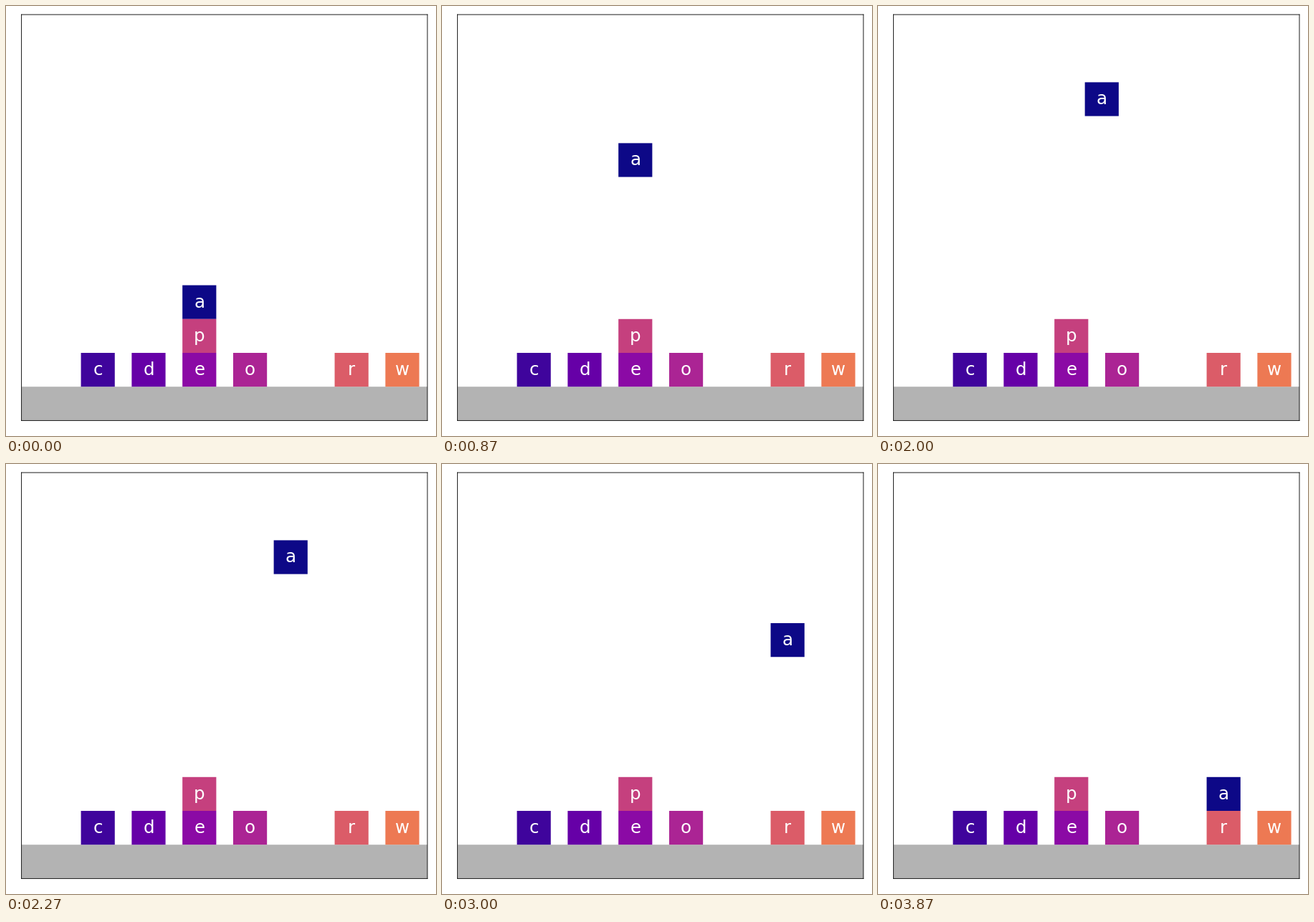
Animation, 600 px wide and 600 px high, one loop 4.87 s. Source, as a matplotlib script:

```python
import matplotlib.pyplot as plt
from matplotlib.animation import FuncAnimation
from matplotlib.patches import Rectangle

LOOP_MS, TICK_MS = 4870, 10
LAST_STEP = 58
LIFT, SLIDE, DROP = 0.3, 0.45, 0.35  # cells per step
START = (4.758, 3)

# letter: lower-left corner in cells, ordered along the colour map
BLOCKS = {
    "a": START,
    "c": (1.758, 1),
    "d": (3.258, 1),
    "e": (4.758, 1),
    "o": (6.258, 1),
    "p": (4.758, 2),
    "r": (9.258, 1),
    "w": (10.758, 1),
}

fig = plt.figure(figsize=(7.5, 7.5), dpi=80, facecolor="white")
ax = fig.add_axes([21.6 / 600, 21.6 / 600, 566.4 / 600, 566.4 / 600])
ax.set(xlim=(0, 12), ylim=(0, 12), xticks=[], yticks=[])
for spine in ax.spines.values():
    spine.set_snap(False)


def add_box(corner, width, color):
    return ax.add_patch(Rectangle(corner, width, 1, facecolor=color,
                                  linewidth=0, snap=False))


def label_position(x, y):
    return x + 0.5, y + 0.49


def add_block(letter, corner, color):
    label = ax.text(*label_position(*corner), letter, color="white",
                    fontsize=22, family="DejaVu Sans",
                    ha="center", va="center")
    return add_box(corner, 1, color), label


add_box((0, 0), 12, "0.7")
shades = [plt.cm.plasma(i * 2 / 21) for i in range(len(BLOCKS))]
artists = {letter: add_block(letter, corner, shade)
           for (letter, corner), shade in zip(BLOCKS.items(), shades)}


def clamp(value, low, high):
    return max(low, min(value, high))


def carried_position(step):
    """Lift, pause, slide and drop; lift and slide skip their first step."""
    lifted = clamp(step + 1, 0, 20) if step >= 1 else 0
    slid = clamp(step - 28, 0, 10) if step >= 30 else 0
    dropped = clamp(step - 38, 0, 20)
    return (START[0] + SLIDE * slid,
            START[1] + LIFT * lifted - DROP * dropped)


def update(tick):
    # 15 steps per second, each shown from its time rounded to 10 ms
    step = min((tick * TICK_MS + 5) * 3 // 200, LAST_STEP)
    position = carried_position(step)
    box, label = artists["a"]
    box.set_xy(position)
    label.set_position(label_position(*position))
    return box, label


anim = FuncAnimation(fig, update, frames=LOOP_MS // TICK_MS,
                     interval=TICK_MS, repeat=True, repeat_delay=0)
plt.show()
```
